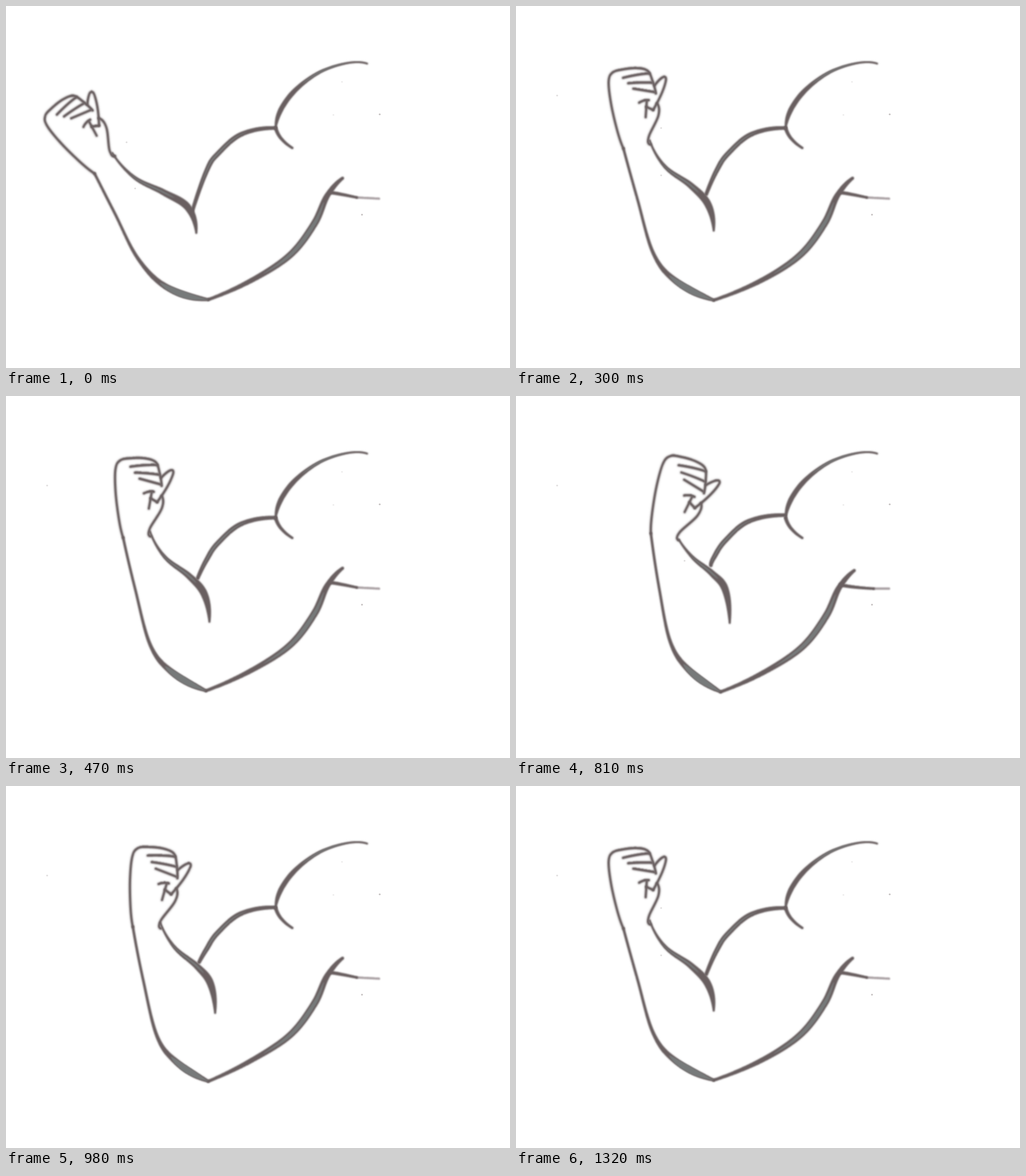
Write an HTML page with a canvas that moves like this. It is 882 px wide and 635 px high and loops after 1.52 s.

```html
<!DOCTYPE html>
<html lang="en">
<head>
<meta charset="utf-8">
<title>Flexing arm</title>
<style>
html, body { margin: 0; width: 100%; height: 100%; overflow: hidden; background: #fff; }
canvas { display: block; }
</style>
</head>
<body>
<canvas id="stage" width="882" height="635"></canvas>
<script>
const ctx = document.getElementById('stage').getContext('2d');
const INK = '#695f60', GRAY = '#777a7a', PALE = '#aaa1a4';

// Key points, as x, y pairs, that the smooth strokes run through
const SHOULDER = [632,101, 598,100, 551,115, 509,145, 482,180, 472,214];
const CREASE = [472,214, 482,233, 501,249];
const UPPER = [432,480, 498,436, 540,381, 562,333, 589,302];
const BICEP = [352,287, 371,259, 412,225, 471,214];

// outer starts at the wrist and ends at the elbow; hinge is the low end of the biceps
const open = {
  outer: [155,294, 190,363, 231,443, 281,493, 354,515],
  inner: [186,258, 225,301, 276,327, 318,353, 333,398],
  hinge: [326,360], thumb: [152,152], shift: [0, 0], dots: [211,239, 226,320]
};
const raised = {
  outer: [188,250, 212,337, 240,433, 278,481, 346,516],
  inner: [234,236, 261,282, 306,315, 336,348, 346,394],
  hinge: [333,330], thumb: [262,127], shift: [0, 0], dots: [72,157, 254,214, 254,297]
};
const bent = {
  outer: [222,247, 240,340, 264,438, 297,483, 354,518],
  inner: [270,240, 295,283, 335,317, 358,347, 366,398],
  hinge: [338,309], thumb: [323,139], shift: [1, 0], dots: [72,157]
};
const flexed = {
  outer: [236,241, 251,340, 270,431, 301,479, 358,519],
  inner: [285,252, 310,284, 343,311, 366,339, 374,398],
  hinge: [341,297], thumb: [356,152], shift: [5, 4], dots: [72,157, 295,289]
};

const mix = (a, b, t) => a.map((v, i) => v + (b[i] - v) * t);
const move = (pts, dx, dy) => pts.map((v, i) => v + (i % 2 ? dy : dx));

function between(a, b, t) {
  const pose = { dots: [72, 157] };
  for (const key of ['outer', 'inner', 'hinge', 'thumb', 'shift']) pose[key] = mix(a[key], b[key], t);
  return pose;
}
const lifting = between(open, raised, 0.45);
const closing = between(raised, bent, 0.5);

// Up to the tightest pose and back, one pose each 170 ms after the first
const CYCLE = [open, lifting, raised, closing, bent, flexed, bent, closing, raised];
const FIRST = 130, STEP = 170, LOOP = 1520;

// Width that swells from thin to thick at the given part of the stroke
function swell(thin, thick, peak) {
  const power = Math.log(0.5) / Math.log(peak);
  return t => thin + (thick - thin) * Math.sin(Math.PI * t ** power);
}
const even = w => () => w;

const spline = (a, b, c, d, t) =>
  b + t / 2 * (c - a + t * (2 * a - 5 * b + 4 * c - d + t * (3 * (b - c) + d - a)));

// Point at t of 0 to 1 along the key points
function along(pts, t) {
  const last = pts.length / 2 - 1;
  const i = Math.min(last - 1, Math.floor(t * last));
  return [0, 1].map(axis => {
    const at = k => pts[2 * k + axis];
    const far = (p, q, r) => last > 1 ? 3 * at(p) - 3 * at(q) + at(r) : 2 * at(p) - at(q);
    const before = i > 0 ? at(i - 1) : far(0, 1, 2);
    const after = i + 2 <= last ? at(i + 2) : far(last, last - 1, last - 2);
    return spline(before, at(i), at(i + 1), after, t * last - i);
  });
}

function sweep(pts, width, color, { from = 0, to = 1, alpha = 1, blur = 0.8 } = {}) {
  const steps = 30 * pts.length;
  ctx.filter = `blur(${blur}px)`;
  ctx.globalAlpha = alpha;
  ctx.fillStyle = color;
  ctx.beginPath();
  for (let s = 0; s <= steps; s++) {
    const t = from + (to - from) * s / steps;
    const [x, y] = along(pts, t), r = width(t) / 2;
    ctx.moveTo(x + r, y);
    ctx.arc(x, y, r, 0, 7);
  }
  ctx.fill();
  ctx.globalAlpha = 1;
}

function brush(pts, width, color = INK, halo = 2) {
  sweep(pts, t => width(t) + halo, color, { alpha: 0.2, blur: 1.6 });
  sweep(pts, width, color);
}

// Gray streak inside part of a stroke
function streak(pts, width, from, to, share) {
  const fade = t => Math.sin(Math.PI * (t - from) / (to - from)) ** 0.5 || 0;
  sweep(pts, t => width(t) * share * fade(t), GRAY, { from, to });
}

function specks(list, alpha) {
  ctx.filter = 'blur(0.7px)';
  ctx.fillStyle = INK;
  ctx.globalAlpha = alpha;
  for (let i = 0; i < list.length; i += 2) {
    ctx.beginPath();
    ctx.arc(list[i], list[i + 1], 1.6, 0, 7);
    ctx.fill();
  }
  ctx.globalAlpha = 1;
}

// Hand strokes in the bent pose, turned and scaled to fit other poses
const HAND = [
  [222,247, 218,215, 217,165, 221,124, 231,109, 250,107, 276,110, 294,119, 299,140, 300,162],
  [301,147, 318,136, 323,141, 311,163, 289,190],
  [298,180, 296,202, 271,236, 271,250],
  [267,172, 276,170, 285,171],
  [281,172, 273,200],
  [278,182, 289,190]
];
for (let i = 0; i < 3; i++) {
  HAND.push([248 + 7 * i, 122 + 11.5 * i, 274 + 3 * i, 122 + 15 * i, 296 + i, 124 + 17.5 * i]);
}

function drawHand({ outer: [wx, wy], thumb: [tx, ty] }) {
  const [px, py] = bent.outer;
  const ux = bent.thumb[0] - px, uy = bent.thumb[1] - py;
  const vx = tx - wx, vy = ty - wy, d = ux * ux + uy * uy;
  const c = (ux * vx + uy * vy) / d, s = (ux * vy - uy * vx) / d;
  for (const stroke of HAND) {
    const local = move(stroke, -px, -py);
    const turned = local.map((v, i) => i % 2 ? s * local[i - 1] + c * v : c * v - s * local[i + 1]);
    brush(move(turned, wx, wy), even(4.2), INK, 3.5);
  }
}

function drawArmpit(drop) {
  const tip = [614 + 3 * drop, 336 + drop / 2];
  brush([...tip, 653, 338], even(3.4), PALE, 1);
  brush([568, 327 + drop, 590, 331 + drop, ...tip], t => 6 - 2 * t);
}

function draw(pose) {
  const [rise, drop] = pose.shift;
  ctx.filter = 'none';
  ctx.fillStyle = '#fff';
  ctx.fillRect(0, 0, 882, 635);
  specks([573, 191, 588, 133], 0.12);
  specks([654, 190, 623, 366], 0.42);
  specks(pose.dots, 0.22);

  const shoulder = swell(3, 8.5, 0.75);
  brush(SHOULDER, shoulder);
  streak(SHOULDER, shoulder, 0.2, 0.55, 0.5);
  brush(CREASE, t => 6 - 2 * t);

  const bicep = [...pose.hinge, ...move(BICEP, -rise, -rise)];
  bicep[8] = 471;
  brush(bicep, swell(6, 8.5, 0.5));
  streak(bicep, swell(6, 8.5, 0.5), 0.1, 0.8, 0.35);

  const upper = [...pose.outer.slice(-2), ...move(UPPER, drop * 0.75, drop)];
  brush(upper, swell(5, 12, 0.55));
  streak(upper, swell(5, 12, 0.55), 0.25, 0.75, 0.55);
  drawArmpit(drop);

  const outer = swell(4.5, 12, 0.85);
  brush(pose.outer, outer);
  streak(pose.outer, outer, 0.7, 1, 0.95);
  const inner = swell(3.5, 12.5, 0.68);
  brush(pose.inner, inner);
  streak(pose.inner, inner, 0.2, 0.6, 0.35);
  drawHand(pose);
}

let shown = null;
const start = performance.now();
function tick() {
  const t = (performance.now() - start) % LOOP;
  const step = t < FIRST ? 0 : 1 + Math.floor((t - FIRST) / STEP);
  const pose = CYCLE[Math.min(step, CYCLE.length - 1)];
  if (pose !== shown) draw(shown = pose);
  requestAnimationFrame(tick);
}
tick();
</script>
</body>
</html>
```
